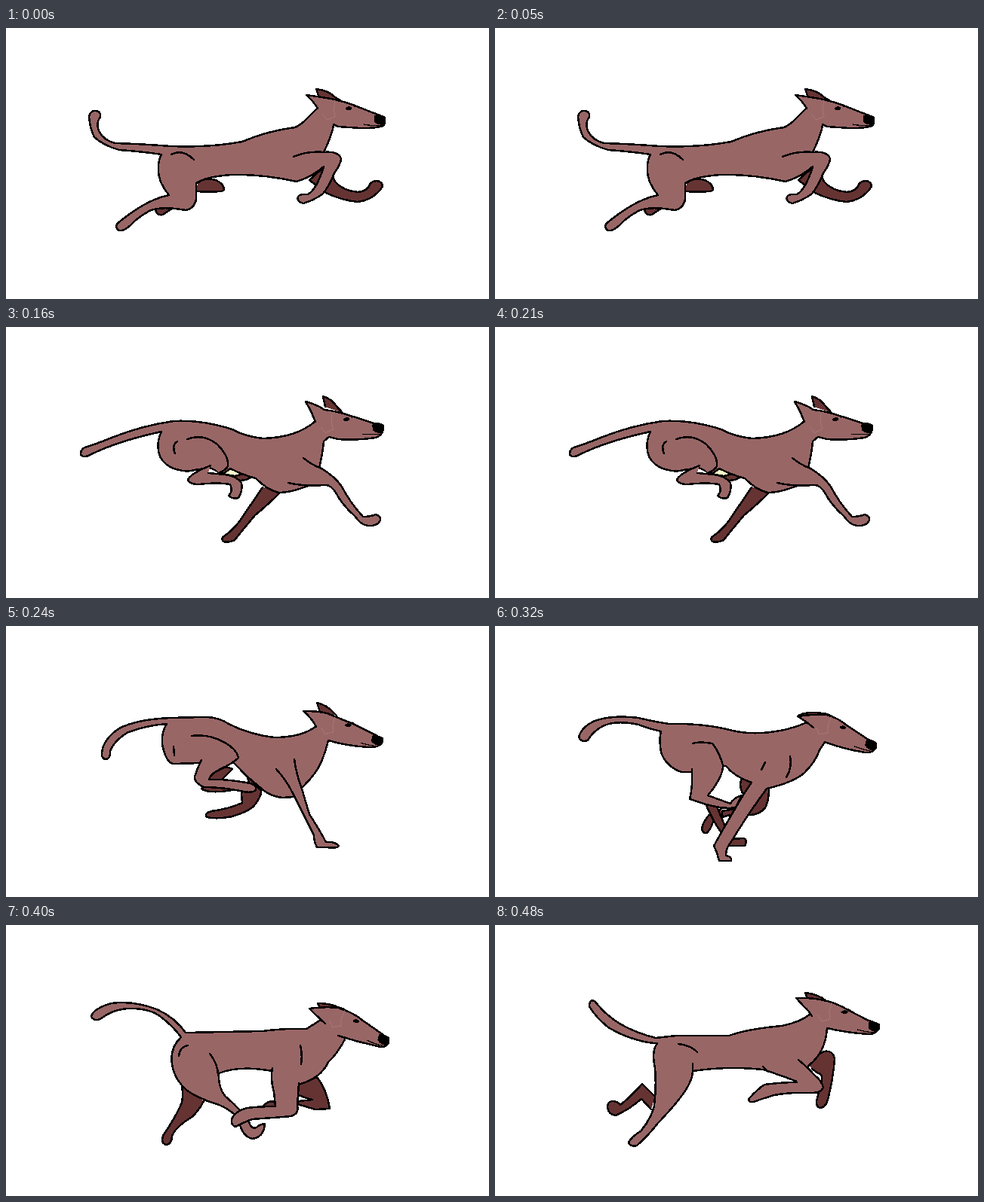
An HTML page without scripts that plays this animation: 640x360 px, repeating every 560 ms.

```html
<!DOCTYPE html>
<html lang="en">
<head>
<meta charset="utf-8">
<title>Running dog</title>
<style>
  html, body { margin: 0; width: 100%; height: 100%; overflow: hidden; background: #fff; }
  svg { display: block; width: 100%; height: 100%; }
  path { fill: #966; stroke: #000; stroke-width: 2.5; stroke-linecap: round; stroke-linejoin: round; shape-rendering: crispEdges; }
  .far { fill: #633; }
  .line { fill: none; }
  .ink { fill: #000; stroke-width: 1; }
  .seam { fill: none; stroke: #b08d88; stroke-width: .8; stroke-dasharray: 1 2; }
  .pose { visibility: hidden; animation: show 560ms step-end infinite; animation-delay: calc((var(--i) - 7) * 80ms); }
  @keyframes show {
    0% { visibility: visible; }
    14.2857%, 100% { visibility: hidden; }
  }
</style>
</head>
<body>
<svg viewBox="0 0 640 360">
  <defs>
    <!-- eye at the origin -->
    <g id="face">
      <path class="seam" d="M-18-11L-20 2L-18 11L-29 15L-34 8"/>
      <path class="ink" d="M-4 0Q0-4 4-1Q3 3-3 1Z"/>
      <path class="ink" d="M5-5L9-3L8-2Z"/>
      <path class="ink" d="M34 10Q41 7 48 11Q50 17 46 21Q39 22 34 17Z"/>
      <path class="line" style="stroke-width:1.3" d="M20 21Q30 23 43 23"/>
    </g>
  </defs>

  <g class="pose" style="--i:0">
    <path class="far" d="M254 206Q262 198 278 202Q289 207 289 215Q287 219 252 217"/>
    <path class="far" d="M198 240Q199 250 208 248L220 240"/>
    <path class="far" d="M402 202L421 185Q431 190 436 204Q446 216 466 218Q480 217 483 206Q491 200 498 206Q501 211 493 218Q483 229 466 231Q445 229 424 219L402 202"/>
    <path class="far" d="M414 90L411 81Q428 83 436 92L446 98"/>
    <path d="M425 100L412 107L400 119Q392 128 383 132Q345 137 313 151Q270 159 218 157Q180 154 145 153Q130 150 123 137Q119 126 125 118Q126 110 118 110Q112 110 110 117Q111 133 117 145Q129 156 150 162Q180 164 206 168Q202 175 202 184Q200 203 216 222Q205 224 190 231Q172 240 152 256Q143 262 148 268Q154 272 165 262Q175 251 190 243Q205 236 238 242Q250 240 252 227L252 206Q266 197 300 195Q340 194 385 204Q405 198 421 184L421 165Q433 140 434 128L440 115"/>
    <path d="M381 171Q400 163 421 165Q440 163 444 173Q444 180 435 193Q427 212 420 220Q408 229 394 233Q385 231 387 224Q390 220 400 221Q408 216 413 205Q419 192 421 184"/>
    <path d="M413 107Q408 98 398 89L419 92Q445 96 462 103L495 116Q504 120 501 129Q497 133 470 133L440 131L434 128"/>
    <path class="line" d="M219 168Q234 160 249 175"/>
    <use href="#face" x="454" y="107"/>
  </g>

  <g class="pose" style="--i:1">
    <path class="far" d="M258 216Q272 225 279 240Q278 251 285 251Q293 250 293 240Q289 227 281 221L270 209"/>
    <path class="far" d="M280 191L297 192L297 200L277 201"/>
    <path class="far" d="M385 206L386 240Q384 260 388 272Q390 281 402 281Q415 281 416 276Q416 269 408 269Q398 271 398 268Q399 245 405 225L411 203"/>
    <path class="far" d="M418 94L415 82Q432 87 440 99L446 104"/>
    <path d="M425 108L413 115Q403 122 390 129Q367 147 336 148Q310 148 280 141Q245 134 214 138Q170 146 127 149Q112 146 110 137Q112 128 104 127Q97 129 98 136Q104 148 115 153Q127 157 150 155Q180 153 208 149Q201 158 201 173Q203 195 225 198L240 198L260 200L280 192Q320 190 340 200Q362 213 385 209L412 203L436 190L428 172Q431 150 431 134L440 122"/>
    <path d="M240 197Q226 199 223 208Q222 222 229 236Q229 247 218 251Q211 256 217 259Q230 263 239 257Q242 248 241 238Q237 225 240 206"/>
    <path d="M260 162Q276 162 281 180Q283 196 275 206Q262 217 253 216Q243 214 239 207"/>
    <path d="M386 171Q420 171 450 176Q459 185 460 200Q465 215 462 238Q458 248 450 247Q442 245 445 236Q450 228 446 215Q441 205 441 197Q420 200 411 203"/>
    <path d="M413 115Q405 104 398 92L415 95Q440 102 462 109L495 119Q506 121 503 130Q499 137 470 138Q445 139 431 134"/>
    <path class="line" d="M222 163L230 156M381 203Q388 208 398 205"/>
    <use href="#face" transform="translate(454 112) rotate(-4)"/>
  </g>

  <g class="pose" style="--i:2">
    <path class="far" d="M340 213Q325 235 308 260Q298 272 290 277Q284 281 288 285Q295 287 303 283Q315 268 330 250Q345 238 362 221L345 212"/>
    <path class="far" d="M300 199L315 195L326 199Q315 206 304 203"/>
    <path style="fill:#ffc" d="M281 194L296 186L315 195L303 198Z"/>
    <path class="far" d="M423 106L420 92Q432 96 437 104L446 114"/>
    <path d="M425 118L410 125Q385 147 340 148Q315 145 300 136Q260 123 222 125Q180 131 140 147Q118 156 104 160Q97 165 100 171Q106 174 113 169Q150 151 206 139Q198 156 204 172Q212 187 230 190Q240 193 250 190L270 187L288 195L297 188Q315 197 331 201Q345 216 362 220Q378 220 400 211L420 206L415 188Q420 165 421 152L428 146L440 135"/>
    <path d="M240 149Q262 141 280 156Q296 172 294 185Q290 191 282 194"/>
    <path d="M271 184Q248 193 241 202Q242 209 255 209Q280 206 297 209Q301 218 295 224Q300 229 308 227Q314 217 312 207Q306 198 290 196L268 194"/>
    <path d="M394 174Q405 183 418 188Q435 198 445 212Q455 232 473 252Q483 252 490 249Q497 251 496 257Q492 265 480 264Q470 263 463 252Q445 236 437 220Q430 209 422 210Q395 212 374 207"/>
    <path d="M410 126Q405 112 397 99Q412 103 422 110Q440 112 460 119L488 128Q500 128 500 135Q499 144 490 147Q465 151 440 149L428 146"/>
    <path class="line" d="M227 152Q219 157 224 168"/>
    <use href="#face" transform="translate(451 123) rotate(-5)"/>
  </g>

  <g class="pose" style="--i:3">
    <path class="far" d="M268 213Q255 215 262 218Q275 223 305 217"/>
    <path class="far" d="M268 207L272 196L292 187L300 190L284 206"/>
    <path class="far" d="M313 194Q322 200 322 210L312 222L313 235Q295 243 272 246Q262 249 266 254Q280 257 300 253Q325 245 330 237Q339 225 338 219L325 205"/>
    <path class="far" d="M416 114L412 102Q425 105 433 114L438 119"/>
    <path d="M425 125L411 133Q392 148 355 148Q322 144 295 130Q280 120 260 121L218 122Q173 124 150 136Q129 150 127 168Q126 177 133 177Q139 175 138 166Q143 153 160 142Q185 132 213 130Q206 140 207 157Q212 182 222 183L258 182L295 176L303 183Q322 203 333 211Q347 226 366 228L382 227L394 213Q412 195 418 180Q424 165 427 152L436 140"/>
    <path d="M246 146Q270 143 290 155Q306 164 308 175Q300 183 284 190Q270 197 269 204Q290 203 318 208Q333 210 331 218Q325 223 310 219Q285 214 262 214Q249 208 250 200Q254 188 259 178"/>
    <path d="M382 177Q385 198 391 213Q396 230 402 250Q415 270 424 287Q436 286 441 292Q440 296 425 294L412 294Q408 286 408 278Q395 252 382 226Q372 205 358 190"/>
    <path d="M411 134Q405 122 394 113Q418 113 428 117Q445 124 460 130L490 145Q500 150 498 156Q492 162 480 161Q450 159 427 152"/>
    <path class="line" d="M222 160L223 172"/>
    <use href="#face" transform="translate(453 132) rotate(7)"/>
  </g>

  <g class="pose" style="--i:4">
    <path class="far" d="M326 204Q323 216 330 225L318 243L300 246L302 254Q316 248 330 251Q350 253 359 240Q363 230 363 216L340 206"/>
    <path class="far" d="M300 243L288 247Q276 257 274 270Q276 277 282 274Q288 266 290 256L300 250"/>
    <path class="far" d="M279 236Q288 258 302 278L310 292L331 292Q335 285 330 282L312 283L294 240"/>
    <path class="far" d="M402 119Q415 112 440 117L448 121"/>
    <path d="M428 128L413 128Q400 134 383 138Q345 146 315 139Q278 129 230 130Q210 127 190 122Q158 118 135 125Q116 132 111 147Q113 155 123 152Q130 139 145 132Q163 125 190 131Q205 137 220 140Q217 150 220 168Q227 187 247 194L262 194L290 185L306 186Q317 200 340 208Q330 222 318 243Q305 265 290 292Q295 302 297 312L313 312Q314 306 306 305Q306 295 312 288Q335 250 360 216Q395 208 410 195Q425 180 430 165L437 154L440 142"/>
    <path d="M262 156Q270 153 288 156Q297 167 302 185Q303 195 290 215L282 225L312 236Q316 228 327 225L319 241Q305 244 280 237L258 230Q262 215 261 190"/>
    <path d="M422 135Q410 125 401 120Q420 117 440 118Q456 123 466 132L495 151Q507 155 505 162Q500 169 490 168Q460 163 437 154"/>
    <path class="line" d="M358 181L353 191M391 173Q394 188 386 201"/>
    <use href="#face" transform="translate(461 135) rotate(12)"/>
  </g>

  <g class="pose" style="--i:5">
    <path class="far" d="M231 206Q236 220 233 236Q225 255 208 280Q205 291 213 292Q220 290 220 280Q225 268 245 256Q255 248 262 234"/>
    <path class="far" d="M388 211L412 202Q425 218 429 244L410 245L386 238L388 234L406 232Q396 230 388 226"/>
    <path class="far" d="M340 241Q348 232 357 235L357 241"/>
    <path class="far" d="M415 108L413 104Q428 104 440 109L448 112"/>
    <path d="M430 120L418 125Q408 132 398 138Q370 137 340 141L238 143Q224 123 200 112Q168 100 140 104Q115 111 113 122Q117 128 125 125Q140 113 160 111Q190 110 205 122Q222 135 232 149Q217 163 220 185Q223 205 240 220Q258 232 280 238Q300 246 308 258Q312 280 326 284Q342 282 343 264Q335 265 332 269Q325 272 322 262L314 250Q303 238 290 227Q281 215 282 197Q310 186 352 194L360 215L384 215L388 212Q418 203 427 182Q440 170 449 152L450 135"/>
    <path d="M353 190Q350 205 355 222L357 241Q335 241 320 243Q303 247 299 258Q298 266 304 268Q315 262 326 258Q355 256 378 254Q389 250 386 240L388 210"/>
    <path d="M423 131Q412 121 402 111Q425 108 440 110Q460 116 473 127L500 146Q510 152 506 158Q502 164 492 161Q465 155 440 147"/>
    <path class="line" d="M229 174Q230 162 241 160M270 171Q281 185 281 200M390 160Q393 172 391 185"/>
    <use href="#face" transform="translate(464 128) rotate(14)"/>
  </g>

  <g class="pose" style="--i:6">
    <path class="far" d="M416 187Q425 172 436 168Q448 166 450 178Q448 205 441 232Q438 243 430 243Q424 240 427 230L433 206Q434 197 428 197L420 191"/>
    <path class="far" d="M212 228L195 211Q180 228 166 239Q163 234 155 234Q149 235 149 242Q150 252 160 253Q178 245 194 231L207 245"/>
    <path class="far" d="M414 98L411 90Q428 92 438 100"/>
    <path d="M428 108L418 118Q405 129 380 134Q335 138 310 147L240 147L213 150Q188 144 165 131Q147 119 138 108L132 101Q125 98 125 108Q132 121 150 136Q170 148 190 153Q203 157 215 157Q207 168 212 190Q214 215 211 240Q207 257 193 274Q180 282 177 289Q179 295 188 293Q203 280 216 263Q240 238 251 222Q262 205 262 194Q310 187 355 192Q380 200 400 208L412 200L415 187Q438 170 440 137L445 125"/>
    <path d="M402 179Q415 190 424 200Q433 207 435 216Q432 223 420 223Q390 222 370 226Q350 232 343 235Q334 236 337 230Q348 218 357 212Q380 209 400 209"/>
    <path d="M420 121Q415 113 410 109L399 97Q420 96 440 101Q455 105 468 113L495 127Q509 130 508 138Q505 145 495 145Q465 143 440 137"/>
    <path class="line" d="M243 158Q260 160 268 169M355 188L362 195M262 184L262 196"/>
    <use href="#face" transform="translate(463 116) rotate(6)"/>
  </g>
</svg>
</body>
</html>
```
